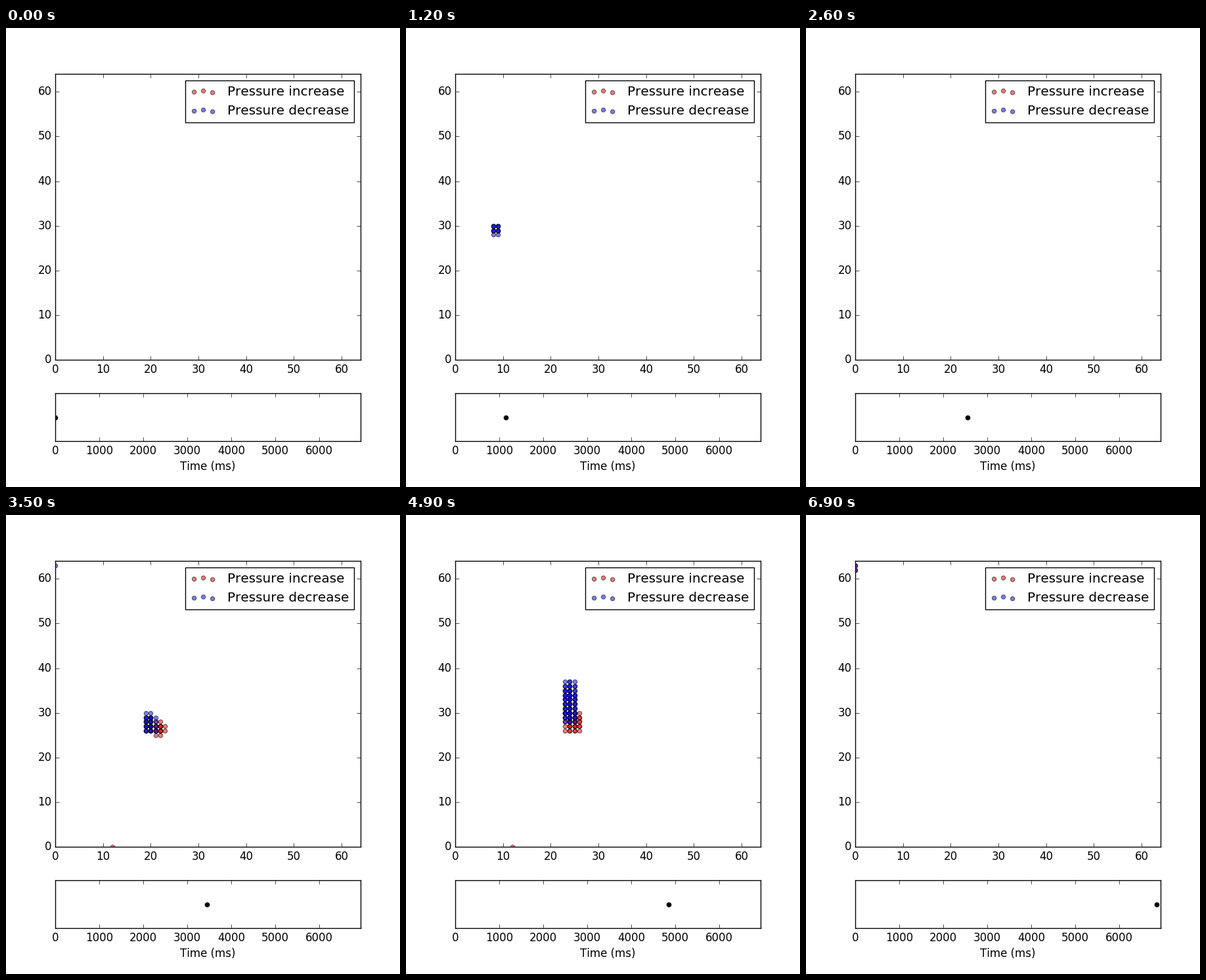
Write a matplotlib script that moves like this. It is 600 px wide and 700 px high and loops after 7 s.

```python
import numpy as np
import matplotlib.pyplot as plt
from matplotlib.animation import FuncAnimation

plt.style.use("classic")
plt.rcParams.update({
    "figure.facecolor": "white",
    "font.sans-serif": ["DejaVu Sans"],
    "text.kerning_factor": 6,  # whole-pixel kerning of older releases
})

FRAMES, STEP, END = 70, 100, 6945
SIZE = 64
GRID_Y, GRID_X = np.mgrid[:SIZE, :SIZE]

# Contact patches: centre x, centre y, half width, half height, peak count
TAP = np.array([8.5, 29.4, 1, 1.2, 3.7])
PRESS = np.array([22.5, 32.4, 1.4, 1.5, 4])
LEAD = np.array([[21.05, 26.3, 1.36, 1.27, 3], [24.8, 28.1, 1.72, 2.36, 3]])
TRAIL = np.array([[19, 26.9, 1.2, 1.66, 4.5], [24.3, 32.85, 1.2, 4.57, 4.5]])
SLIDE = (33, 50)

# Per side: first step, last step, patch at the start, patch at the end
RISING = [(9, 10, TAP, TAP), (*SLIDE, *LEAD), (56, 58, PRESS, PRESS)]
FALLING = [(11, 13, TAP, TAP), (*SLIDE, *TRAIL), (59, 61, PRESS, PRESS)]


def cells(patch):
    """Grid cells under a flat-topped patch, repeated once per event."""
    cx, cy, w, h, peak = patch
    falloff = np.exp(-((GRID_X - cx) / w) ** 4 - ((GRID_Y - cy) / h) ** 4)
    counts = np.round(peak * falloff).astype(int).ravel()
    spots = np.column_stack([GRID_X.ravel(), GRID_Y.ravel()])
    return np.repeat(spots, counts, axis=0).tolist()


def contacts(bursts, n):
    found = []
    for first, last, start, end in bursts:
        if first <= n <= last:
            u = (n - first) / (last - first)
            found += cells(start + (end - start) * u)
    return found


def noise(n):
    """Faulty cells: a pulsing corner and one on the border while sliding."""
    red, blue = [], []
    if n % 17 == 1:
        depth = max(1, round(2 * n / FRAMES))
        blue = [(0, SIZE - 1 - i) for i in range(depth)]
        red = blue * (depth - 1)
    if SLIDE[0] <= n <= SLIDE[1]:
        red = red + [(12, 0)]
    return red, blue


def offsets(points):
    return np.array(points, float).reshape(-1, 2)


fig, (ax, bar) = plt.subplots(
    2, 1, figsize=(6, 7), dpi=100, gridspec_kw={"height_ratios": [6, 1]})

ticks = range(0, 61, 10)
ax.set(xlim=(0, SIZE), ylim=(0, SIZE), xticks=ticks, yticks=ticks)
rise = ax.scatter([], [], s=20, c="red", alpha=0.5, label="Pressure increase")
fall = ax.scatter([], [], s=20, c="blue", alpha=0.5, label="Pressure decrease")
ax.legend(loc="upper right")

bar.set(xlim=(0, END), ylim=(-1, 1), xticks=range(0, 6001, 1000), yticks=[])
bar.set_xlabel("Time (ms)")
clock = bar.scatter([0], [0], s=20, c="black")


def update(n):
    red, blue = noise(n)
    rise.set_offsets(offsets(red + contacts(RISING, n)))
    fall.set_offsets(offsets(blue + contacts(FALLING, n)))
    clock.set_offsets([(max(0, (n - 0.5) * STEP), 0)])
    return rise, fall, clock


anim = FuncAnimation(fig, update, frames=FRAMES, interval=STEP, repeat=True,
                     repeat_delay=0, init_func=lambda: update(0))
plt.show()
```
